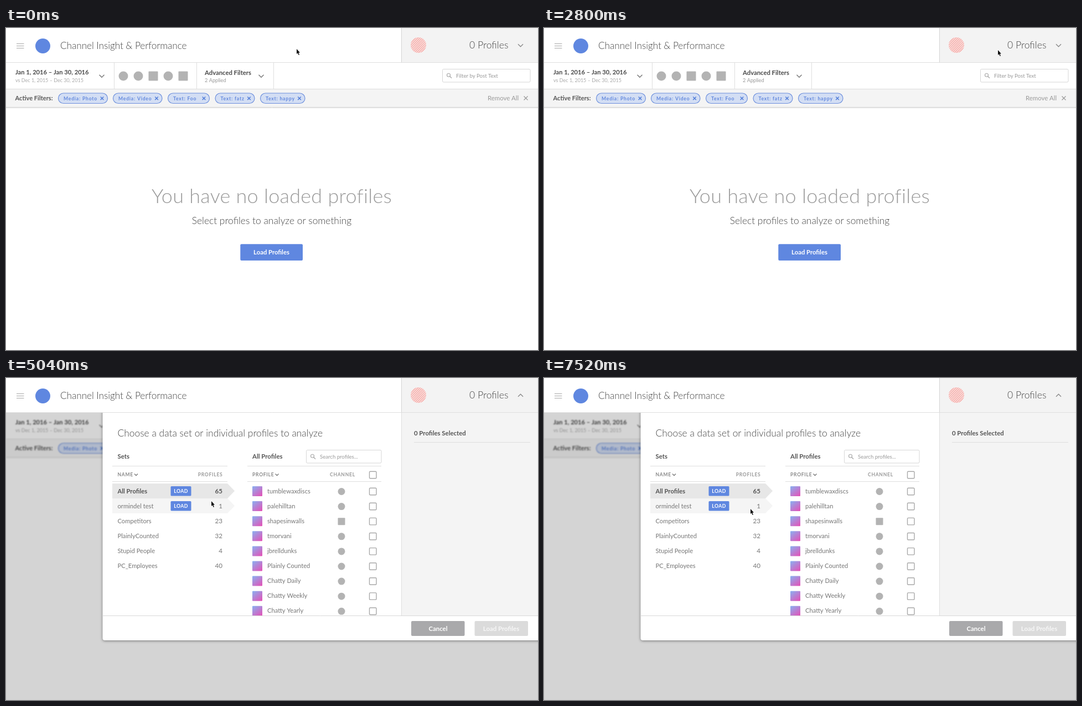
These frames come from a looping animation (961x583 px, 8 s). An HTML page with a canvas:

```html
<!DOCTYPE html>
<html lang="en">
<head>
<meta charset="utf-8">
<title>Profile picker</title>
<style>
html, body { margin: 0; width: 100%; height: 100%; overflow: hidden; background: #fff; }
canvas { display: block; }
</style>
</head>
<body>
<canvas id="stage" width="961" height="583"></canvas>
<script>
const W = 961, H = 583, LOOP = 8000, STEP = 80, OPEN_AT = 2880;
const BLUE = '#5f87e0', DARK = '#555', MID = '#777', PALE = '#aaa', LINE = '#dedede';
const ROW = 27.1, ROW_TOP = 191;
const screen = document.getElementById('stage').getContext('2d');
let g = screen;

function text(str, x, y, size, color, { weight = 400, align = 'left', gap = 0 } = {}) {
  g.font = `${weight} ${size}px Lato, "Open Sans", sans-serif`;
  g.letterSpacing = gap + 'px';
  g.textAlign = align;
  g.fillStyle = color;
  g.fillText(str, x, y);
}

function box(x, y, w, h, fill, r = 0, stroke, width = 1) {
  g.beginPath();
  g.roundRect(x, y, w, h, r);
  if (fill) { g.fillStyle = fill; g.fill(); }
  if (stroke) { g.strokeStyle = stroke; g.lineWidth = width; g.stroke(); }
}

function path(points, color, width = 1) {
  g.beginPath();
  points.forEach(([x, y]) => g.lineTo(x, y));
  g.strokeStyle = color;
  g.lineWidth = width;
  g.stroke();
}

function dot(x, y, r, fill) {
  g.beginPath();
  g.arc(x, y, r, 0, 7);
  g.fillStyle = fill;
  g.fill();
}

const hline = (x1, x2, y, color = LINE) => path([[x1, y], [x2, y]], color);
const vline = (x, y1, y2, color = LINE) => path([[x, y1], [x, y2]], color);

function chevron(x, y, size, color, width, dir = 1) {
  path([[x - size, y - dir * size / 2], [x, y + dir * size / 2], [x + size, y - dir * size / 2]], color, width);
}

function cross(x, y, r, color, width) {
  path([[x - r, y - r], [x + r, y + r]], color, width);
  path([[x - r, y + r], [x + r, y - r]], color, width);
}

function searchBox(x, y, w, h, label) {
  box(x, y, w, h, '#fff', 2, '#d6d6d6');
  const cx = x + 11, cy = y + h / 2 - 1;
  g.beginPath();
  g.arc(cx, cy, 3, 0, 7);
  g.strokeStyle = PALE;
  g.lineWidth = 1.2;
  g.stroke();
  path([[cx + 2, cy + 2], [cx + 5.5, cy + 5.5]], PALE, 1.4);
  text(label, x + 24.5, y + h / 2 + 4, 9.6, '#999');
}

function channel(x, y, r, square) {
  if (square) box(x - r, y - r, 2 * r, 2 * r, '#b3b3b3', 1);
  else dot(x, y, r, '#b3b3b3');
}

function header(open) {
  box(0, 0, W, 62, '#fff');
  box(715, 0, 246, 62, '#f3f3f3');
  vline(714.5, 0, 62, '#d4d4d4');
  hline(0, W, 62.5);
  for (const y of [28.5, 32.5, 36.5]) hline(19, 32.5, y, '#a5a5a5');
  dot(66.5, 32.5, 13.5, BLUE);
  text('Channel Insight & Performance', 98, 38, 17.3, '#444', { weight: 300, gap: -0.1 });

  g.save();
  dot(745, 31, 14, '#fbdfdd');
  g.clip();
  for (let x = 712; x < 770; x += 4) path([[x, 46], [x + 30, 16]], '#f2a5a2', 1.2);
  g.restore();

  text('0 Profiles', 837, 37, 17.6, '#444', { weight: 300 });
  chevron(929.5, 31.5, 4.5, '#8a8a8a', 1.4, open ? -1 : 1);
}

function toolbar() {
  const bold = { weight: 700 };
  text('Jan 1, 2016 – Jan 30, 2016', 17, 84, 11.2, '#4a4a4a', bold);
  text('vs Dec 1, 2015 – Dec 30, 2015', 17, 97.5, 9, PALE);
  chevron(173, 87, 4.5, MID, 1.4);
  [212, 239, 266, 293, 320].forEach((x, i) => channel(x, 87, 8.5, i === 2 || i === 4));
  text('Advanced Filters', 359, 84.5, 11.3, '#4a4a4a', bold);
  text('2 Applied', 359, 97.5, 9.2, '#999');
  chevron(461, 87, 4.5, MID, 1.4);
  for (const x of [195.5, 344.5, 483.5]) vline(x, 62, 110);
  searchBox(788.5, 74.5, 158.5, 23.5, 'Filter by Post Text');

  box(0, 111, W, 32, '#f4f4f4');
  hline(0, W, 110.5);
  hline(0, W, 143.5, '#d6d6d6');
  hline(0, W, 144.5, '#e8e8e8');
  hline(0, W, 145.5, '#f7f7f7');
  text('Active Filters:', 16.5, 131, 11.1, DARK, bold);
  const pills = [['Media: Photo', 94, 184], ['Media: Video', 193, 282.5], ['Text: Foo', 292, 368],
    ['Text: fatz', 377.5, 449.5], ['Text: happy', 459, 540.5]];
  for (const [label, a, b] of pills) {
    box(a + 0.5, 118, b - a - 1, 18.5, '#d3def4', 9.25, '#6f91dd', 1.2);
    text(label, a + 10, 130.5, 8.6, '#6288dd', { weight: 700, gap: 0.8 });
    cross(b - 10.5, 127.3, 2.8, '#5580da', 1.5);
  }
  text('Remove All', 870, 131, 11.4, '#999');
  cross(939, 127, 3.5, '#999', 1.2);
}

function emptyPage() {
  box(0, 0, W, H, '#fff');
  toolbar();
  header(false);
  text('You have no loaded profiles', 480, 317, 36, '#999', { weight: 300, align: 'center', gap: 0.25 });
  text('Select profiles to analyze or something', 480, 355, 17.4, '#444', { weight: 300, align: 'center' });
  box(423.3, 391.3, 112.7, 29.7, BLUE, 2);
  text('Load Profiles', 479.5, 410, 11.3, '#fff', { weight: 700, align: 'center' });
}

const sets = [['All Profiles', 65], ['ormindel test', 1], ['Competitors', 23],
  ['PlainlyCounted', 32], ['Stupid People', 4], ['PC_Employees', 40]];
const profiles = ['tumblewaxdiscs', 'palehilltan', 'shapesinwalls', 'tmorvani', 'jbrelldunks',
  'Plainly Counted', 'Chatty Daily', 'Chatty Weekly', 'Chatty Yearly'];

function setRow(i, state) {
  const y = ROW_TOP + ROW * i, chosen = state === 'chosen';
  if (state) {
    g.beginPath();
    [[192, y], [400, y], [413, y + 13.5], [400, y + 27], [192, y + 27]].forEach(([a, b]) => g.lineTo(a, b));
    g.fillStyle = chosen ? '#e7e7e7' : '#f5f5f5';
    g.fill();
    box(297.5, y + 5, 37, 17.5, BLUE, 1.5);
    text('LOAD', 316, y + 17, 8.8, '#fff', { weight: 700, align: 'center', gap: 0.4 });
  }
  const weight = chosen ? 700 : 400, color = chosen ? DARK : MID;
  text(sets[i][0], 201.5, y + 17.5, 11.2, color, { weight });
  text(sets[i][1], 391, y + 17.5, 11.6, color, { weight, align: 'right' });
}

function checkbox(y) {
  box(656.5, y - 6.3, 12.5, 12.5, '#fff', 1.5, '#a8a8a8', 1.4);
}

function profileRow(name, i) {
  const y = ROW_TOP + 14 + ROW * i;
  const tint = g.createLinearGradient(447, y - 9, 461, y + 9);
  tint.addColorStop(0, '#8eabee');
  tint.addColorStop(1, '#e254b8');
  box(445, y - 9, 18, 18, tint, 1);
  text(name, 472, y + 3.5, 11.2, MID);
  channel(606, y + 0.5, 6.5, i === 2);
  checkbox(y + 0.5);
}

function modalPage() {
  box(0, 0, W, H, '#fff');
  g.filter = 'blur(1px)';
  toolbar();
  g.filter = 'none';
  box(0, 0, W, H, 'rgba(0,0,0,.17)');

  g.save();
  g.shadowColor = 'rgba(0,0,0,.45)';
  g.shadowBlur = 5;
  g.shadowOffsetY = 1;
  box(174.5, 40, 800, 435, '#fff', 4);
  g.restore();
  header(true);

  box(715, 63, 246, 367, '#f4f4f4');
  vline(714.5, 62, 430);
  hline(174.5, W, 430.5, '#d8d8d8');
  text('0 Profiles Selected', 737, 104, 11.4, DARK, { weight: 700 });
  hline(737, 947, 116.5);

  text('Choose a data set or individual profiles to analyze', 201.5, 106, 17.4, '#444', { weight: 300 });
  text('Sets', 201.5, 146, 11.4, DARK, { weight: 700 });
  text('All Profiles', 445, 146, 11.4, DARK, { weight: 700 });
  searchBox(542.5, 130.5, 135.5, 23.5, 'Search profiles...');
  for (const y of [159.5, 187.5]) {
    hline(192, 400, y);
    hline(436, 678, y);
  }
  const caps = { weight: 700, gap: 0.7 };
  text('NAME', 201.5, 178, 8.6, '#888', caps);
  chevron(235, 175, 3, MID, 1.3);
  text('PROFILES', 391.5, 178, 8.6, '#999', { ...caps, align: 'right' });
  text('PROFILE', 445, 178, 8.6, '#888', caps);
  chevron(489.5, 175, 3, MID, 1.3);
  text('CHANNEL', 585, 178, 8.6, '#999', caps);
  checkbox(175.5);

  sets.forEach((_, i) => setRow(i, i ? '' : 'chosen'));
  g.save();
  g.beginPath();
  g.rect(436, 188, 250, 242);
  g.clip();
  profiles.forEach(profileRow);
  g.restore();

  box(732, 440, 96.5, 27, '#a9a9ab', 2);
  text('Cancel', 780.5, 457.5, 11.4, '#fff', { weight: 700, align: 'center' });
  box(846.5, 440, 96.5, 27, '#dbdbdb', 2);
  text('Load Profiles', 894.5, 457.5, 11.4, '#f7f7f7', { weight: 700, align: 'center' });
}

function layer(draw) {
  const c = document.createElement('canvas');
  c.width = W;
  c.height = H;
  g = c.getContext('2d');
  draw();
  g = screen;
  return c;
}

// time, x, y of the pointer tip
const trail = [[0, 525, 38], [80, 519, 235], [240, 519, 235], [560, 515, 309], [640, 515, 309],
  [880, 509, 391], [1280, 765, 102], [1360, 765, 102], [1840, 801, 53], [2240, 819, 40],
  [2320, 815, 41], [2400, 820, 40], [3360, 820, 40], [4000, 610, 113], [4160, 610, 113],
  [4480, 520, 170], [4640, 520, 170], [5040, 371, 223], [5200, 367, 234], [5360, 367, 234],
  [6240, 352, 336], [6560, 348, 345], [6800, 350, 340], [7120, 366, 287], [7520, 373, 237], [8000, 373, 237]];

function pointerAt(t) {
  const i = trail.findIndex(k => k[0] > t);
  const [t0, x0, y0] = trail[i - 1], [t1, x1, y1] = trail[i];
  const p = (t - t0) / (t1 - t0);
  return [x0 + (x1 - x0) * p, y0 + (y1 - y0) * p];
}

function pointer(x, y, pressed) {
  if (pressed) {
    g.beginPath();
    g.arc(x + 2.5, y + 5.5, 12.3, 0, 7);
    g.fillStyle = 'rgba(255,255,255,.6)';
    g.fill();
    g.strokeStyle = '#333';
    g.lineWidth = 1;
    g.stroke();
  }
  g.beginPath();
  [[0, 0], [0, 9], [2, 7.3], [3.6, 11], [5, 10.4], [3.5, 6.8], [6, 6.5]].forEach(([a, b]) => g.lineTo(x + a, y + b));
  g.closePath();
  g.strokeStyle = '#fff';
  g.lineWidth = 1.4;
  g.stroke();
  g.fillStyle = '#111';
  g.fill();
}

const empty = layer(emptyPage), modal = layer(modalPage);

function frame(now) {
  const t = Math.floor(now % LOOP / STEP) * STEP;
  const open = t >= OPEN_AT;
  const [x, y] = pointerAt(t);
  g.drawImage(open ? modal : empty, 0, 0);
  if (open && x > 192 && x < 413) {
    const i = Math.floor((y - ROW_TOP) / ROW);
    if (i > 0 && i < sets.length) {
      box(192, ROW_TOP + ROW * i, 222, 27, '#fff');
      setRow(i, 'hover');
    }
  }
  pointer(x, y, (t >= 1760 && t < 1920) || (t >= 2640 && t < 2800));
  requestAnimationFrame(frame);
}
requestAnimationFrame(frame);
</script>
</body>
</html>
```
